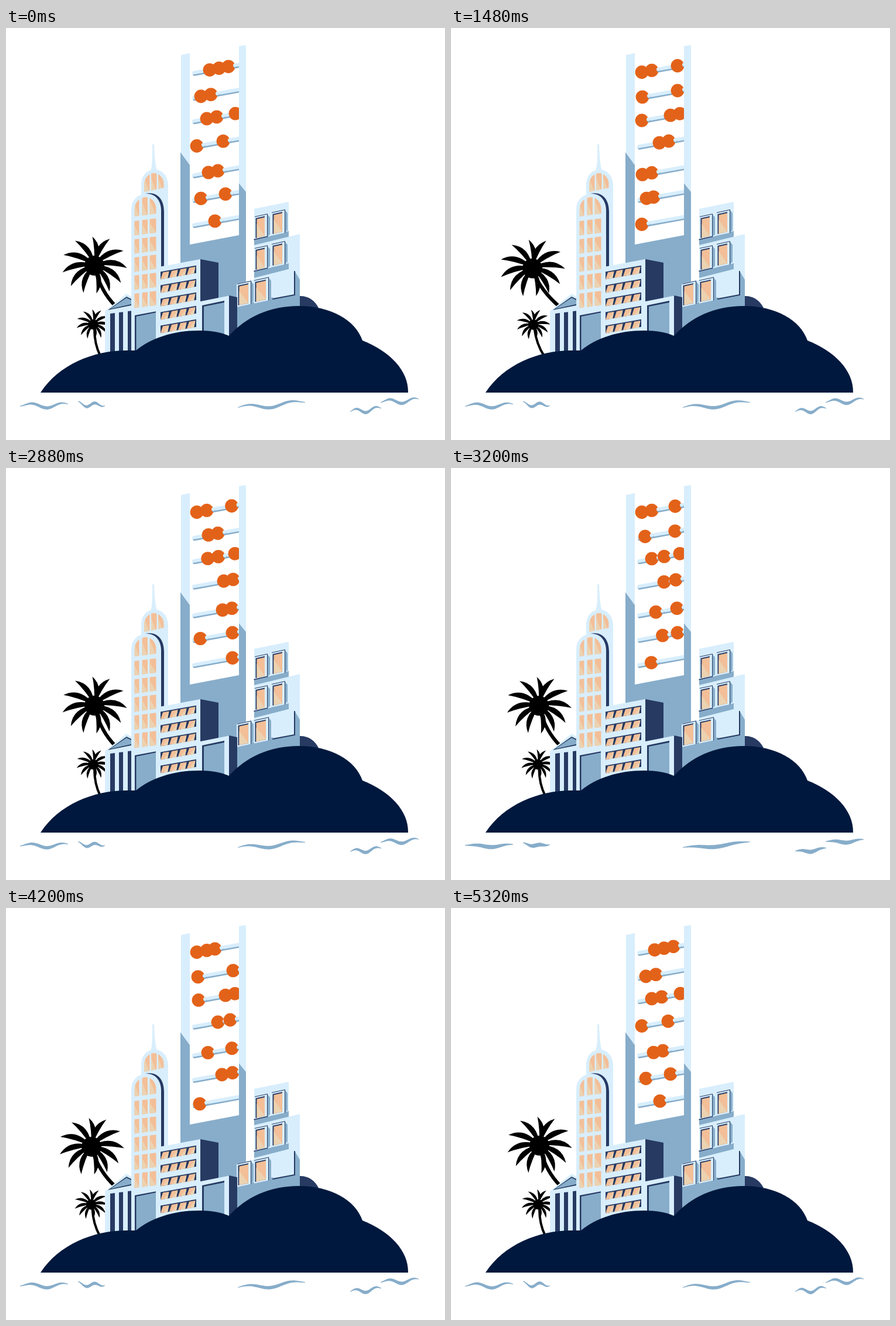
An HTML page with a canvas that plays this animation: 750 by 704 pixels, repeating every 5360 ms.

```html
<!DOCTYPE html>
<html lang="en">
<head>
<meta charset="utf-8">
<title>Abacus island</title>
<style>
html, body { margin: 0; width: 100%; height: 100%; overflow: hidden; background: #fff; }
canvas { display: block; }
</style>
</head>
<body>
<canvas id="stage" width="750" height="704"></canvas>
<script>
const ctx = document.getElementById('stage').getContext('2d');
const { PI, sin, cos, abs, floor, min, max } = Math;
const LOOP = 5360, STEP = 40, HALF = 2880;
const LIGHT = '#d8eefd', BLUE = '#87adca', DARK = '#263a62', NAVY = '#00183d',
      PEACH = '#f3bf98', CREAM = '#ebd2b1', ORANGE = '#e36219';

// Beads rest in four poses; each move starts at the given time, plus the rod's wait
const MOVES = [250, 2300, 2880, 4200], GLIDE = 450;
const rods = [
  { y: 75.5, wait: 400, poses: [[348, 364, 380], [326, 343, 387], [326, 343, 383], [326, 343, 357]] },
  { y: 118, wait: 0, poses: [[333, 350], [327, 387], [346, 362], [328, 388]] },
  { y: 158, wait: 200, poses: [[343, 360, 392], [326, 375, 391], [346, 362, 391], [329, 375, 391]] },
  { y: 201.5, wait: 0, poses: [[326, 371], [356, 372], [372, 388], [362, 383]] },
  { y: 250.5, wait: 0, poses: [[346, 362], [327, 343], [370, 386], [345, 386]] },
  { y: 292.5, wait: 0, poses: [[333, 375], [334, 346], [332, 387], [369, 387]] },
  { y: 335.5, wait: 0, poses: [[357], [326], [387], [331]] }
];

// x0, x1, y, tilt, crest
const waves = [
  [24, 106, 643, 0, .25],
  [123, 169, 641, 1, .62],
  [396, 511, 647.5, -10, .17],
  [588, 641, 653.5, -5, .2],
  [640, 705, 636.5, -2, .25]
];

const ease = p => p * p * (3 - 2 * p);

function beadsAt({ wait, poses }, t) {
  let xs = poses[0];
  MOVES.forEach((from, i) => {
    const e = ease(max(0, min(1, (t - wait - from) / GLIDE)));
    const next = poses[(i + 1) % poses.length];
    xs = xs.map((x, k) => x + (next[k] - x) * e);
  });
  return xs;
}

// A wide sway followed by a narrow one
const swayAt = t => t < HALF
  ? -12 * sin(PI * t / HALF) ** 2
  : -5 * sin(PI * (t - HALF) / (LOOP - HALF)) ** 2;

function shape(color, d) {
  ctx.fillStyle = color;
  ctx.fill(new Path2D(d));
}

function poly(color, ...pts) {
  shape(color, 'M' + pts.join(' ') + 'Z');
}

function line(color, width, d) {
  ctx.strokeStyle = color;
  ctx.lineWidth = width;
  ctx.stroke(new Path2D(d));
}

function disc(color, x, y, r) {
  ctx.fillStyle = color;
  ctx.beginPath();
  ctx.arc(x, y, r, 0, 2 * PI);
  ctx.fill();
}

function clipped(d, draw) {
  ctx.save();
  ctx.clip(new Path2D(d));
  draw();
  ctx.restore();
}

// Upright strip whose top edge follows a slope
function slab(color, x, y, w, h, slope) {
  const dy = slope * w;
  poly(color, x, y, x + w, y + dy, x + w, y + h + dy, x, y + h);
}

// Glass with a diagonal reflection
function pane(x, y, w, h, slope) {
  slab(PEACH, x, y, w, h, slope);
  poly(CREAM, x, y + h * .25, x + w, y + h + slope * w, x, y + h);
}

function palm(x, y, size, sway, lift, trunk, width) {
  const hx = x + sway, hy = y + lift * sway;
  const [cx, cy, bx, by] = trunk;
  ctx.lineCap = 'round';
  line('#000', width, `M${hx + 2} ${hy + 8}Q${cx + sway * .6} ${cy} ${bx + sway * .25} ${by}`);
  ctx.save();
  ctx.translate(hx, hy);
  ctx.rotate(sway * .005 / size);
  ctx.scale(size, size);
  disc('#000', 0, 1, 17);
  for (let i = 0; i < 12; i++) {
    const a = (30 * i - 4 + 9 * sin(i * PI / 6)) * PI / 180;
    const len = 48 + 8 * abs(sin(a));
    const dx = len * sin(a), dy = -len * cos(a), s = dx > 0 ? 1 : -1;
    const ctrl = k => `${dx * .58 + s * dy * k} ${dy * .58 - s * dx * k}`;
    shape('#000', `M0 0Q${ctrl(.4)} ${dx} ${dy}Q${ctrl(.06)} 0 0Z`);
  }
  ctx.restore();
}

function abacus(t) {
  poly(BLUE, 298, 212, 314, 234, 314, 370, 398, 354, 398, 265, 410, 280, 410, 470, 298, 470);
  clipped('M314 30H398V370H314Z', () => {
    ctx.lineCap = 'round';
    for (const rod of rods) {
      const at = x => rod.y - (x - 326) * .18;
      line(BLUE, 6, `M322 ${at(322) + 2.5}L404 ${at(404) + 2.5}`);
      line(LIGHT, 6, `M321 ${at(321)}L404 ${at(404)}`);
      for (const x of beadsAt(rod, t)) {
        disc(ORANGE, x, at(x), 11.4);
        disc(BLUE, x + 11.5, at(x + 11.5) + 2, 2.8);
        disc(LIGHT, x + 11, at(x + 11), 3);
      }
    }
  });
  poly(LIGHT, 299, 46, 314, 43, 314, 234, 299, 212);
  poly(LIGHT, 398, 31, 410, 29, 410, 280, 398, 265);
}

function towers() {
  shape(LIGHT, 'M250 199H253Q254 232 258 244H247Q251 232 250 199Z');
  shape(LIGHT, 'M231 300V268C231 251 242 242 254 242C268 242 277 254 277 270V410H231Z');
  clipped('M236 280V268C236 255 245 248 253 248C263 248 270 258 270 268V273L236 280Z', () => {
    for (let c = 0; c < 3; c++) pane(236 + c * 12, 248, 9.5, 34, -.15);
  });
  shape(DARK, 'M238 283C258 279 270 292 270 314V408H255V300Z');
  shape(LIGHT, 'M214 490V310C214 294 225 284 240 283C257 283 265 297 265 312V490Z');
  const columns = (y, h) => {
    for (let c = 0; c < 3; c++) pane(219.5 + c * 13, y - c * 1.7, 8 + c * 1.5, h, -.13);
  };
  clipped('M219.5 322V310C219.5 298 229 289 239 289C250 289 257 300 257 311V317L219.5 322Z',
    () => columns(289, 36));
  for (let r = 0; r < 5; r++) columns(330 + r * 31, 24.5);
}

// Framed window with its side shadow
function frame(x, y, w) {
  const h = 40, slope = -.22, dy = slope * w, r = x + w;
  poly(BLUE, r, y + dy, r + 5, y + dy + 6, r + 5, y + dy + h - 5, r, y + dy + h);
  slab(DARK, x, y, w + 1, h, slope);
  slab(LIGHT, x, y + 1, w, h - 1, slope);
  slab(DARK, x + 1.5, y + 3, w - 5.5, h - 6, slope);
  pane(x + 3.5, y + 4.5, w - 7.5, h - 8, slope);
}

function rightBlock() {
  shape(DARK, 'M500 458C516 457 527 465 534 478H500Z');
  poly(LIGHT, 424, 309, 483, 297, 483, 356, 424, 366);
  poly(BLUE, 424, 362, 446, 357, 483, 347, 483, 358, 424, 372);
  poly(LIGHT, 424, 371, 502, 352, 502, 432, 424, 440);
  poly(BLUE, 424, 416, 446, 411, 483, 402, 483, 412, 424, 427);
  for (const y of [322, 376]) {
    frame(425, y, 21);
    frame(454, y - 7, 22);
    line(DARK, 1.5, `M424 ${y + 39.5}L446 ${y + 34.5}`);
  }
  poly(BLUE, 394, 470, 456, 455, 493, 415, 502, 430, 502, 500, 394, 520);
  poly(LIGHT, 394, 437, 424, 430, 456, 421, 494, 413, 494, 456, 456, 462, 394, 476);
  poly(BLUE, 418, 470, 456, 460, 456, 476, 418, 480);
  line(DARK, 2, 'M493 416V456L456 463');
  frame(395, 437, 23);
  frame(424, 431, 24);
}

function offices() {
  poly(DARK, 332, 395, 363, 401, 363, 466, 332, 475);
  poly(LIGHT, 257, 409, 332, 395, 332, 535, 257, 535);
  for (let r = 0; r < 5; r++) {
    const y = 416.5 + r * 23;
    slab(DARK, 264, y, 61, 13, -.175);
    for (let c = 0; c < 4; c++) {
      const x = 264 + c * 15, top = y - c * 2.6 + 1, base = top + 12;
      poly(PEACH, x + 4, top, x + 14.5, top - 1.8, x + 12, base - 2, x, base);
      poly(CREAM, x + 14.5, top - 1.8, x + 12, base - 2, x + 5, base - 1);
    }
  }
  poly(DARK, 381, 457, 395, 460, 395, 520, 381, 528);
  slab(LIGHT, 328, 468, 53, 78, -.2);
  slab(DARK, 335, 474, 38, 70, -.21);
  slab(BLUE, 338, 476, 35, 68, -.2);
}

function temple() {
  poly(LIGHT, 169, 484, 206, 454, 216, 460, 216, 486, 262, 477, 262, 560, 169, 560);
  poly(DARK, 174, 482, 206, 459, 214, 463, 214, 474);
  poly(BLUE, 178, 480, 206, 461, 214, 465, 214, 472);
  for (let c = 0; c < 3; c++) slab(DARK, 178 + c * 15, 488 - c * 2, 8 - c, 70, -.12);
  slab(DARK, 220, 491, 36, 70, -.19);
  slab(BLUE, 222.5, 493, 33.5, 68, -.2);
}

function hill() {
  shape(NAVY, `M59 623C90 575 150 551 205 551L222 551C248 530 285 517 330 517
    C350 517 368 520 381 526C410 494 450 475 500 475C555 475 597 499 609 534
    C655 552 688 585 687 623Z`);
}

function sea(t) {
  const n = 30, swell = .65 + .35 * cos(8 * PI * t / LOOP);
  for (const [x0, x1, y, tilt, crest] of waves) {
    const edge = (i, thick) => {
      const u = i / n;
      const top = y + tilt * u - 3.5 * swell * cos(2 * PI * (u - crest) / .62);
      return [x0 + (x1 - x0) * u, top + thick * sin(PI * u) + (thick ? 1 : 0)];
    };
    const pts = [];
    for (let i = 0; i <= n; i++) pts.push(edge(i, 0));
    for (let i = n; i >= 0; i--) pts.push(edge(i, 7 - 2.5 * swell));
    poly(BLUE, ...pts.flat());
  }
}

function draw(t) {
  const sway = swayAt(t);
  ctx.fillStyle = '#fff';
  ctx.fillRect(0, 0, 750, 704);
  palm(151, 405, 1, sway, -.4, [162, 450, 187, 475], 6);
  palm(149, 506, .52, sway * .7, -.05, [151, 540, 161, 560], 4);
  abacus(t);
  towers();
  rightBlock();
  offices();
  temple();
  hill();
  sea(t);
}

const start = performance.now();
function tick() {
  const t = (performance.now() - start) % LOOP;
  draw(floor(t / STEP) * STEP);
  requestAnimationFrame(tick);
}
tick();
</script>
</body>
</html>
```
